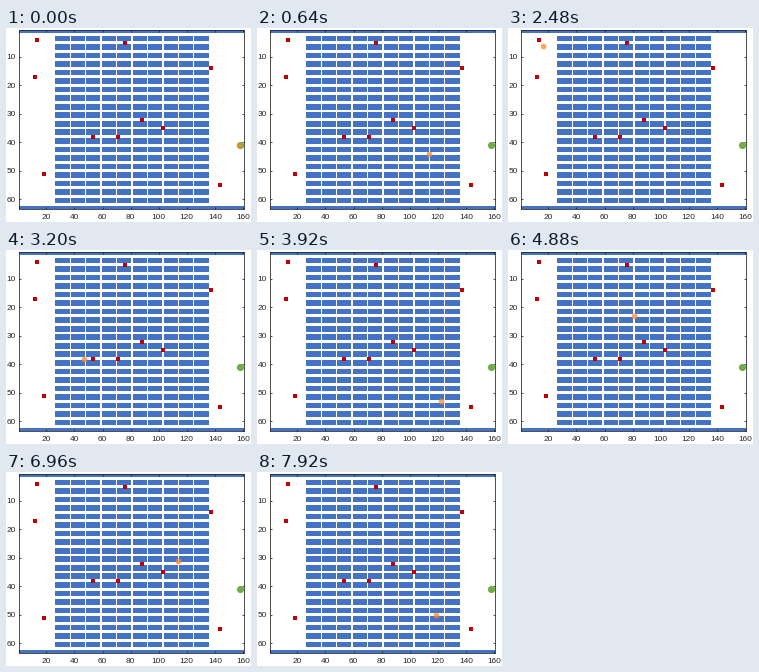
A matplotlib script that plays this animation: 245x194 px, repeating every 8000 ms.

```python
import matplotlib.pyplot as plt
from matplotlib.animation import FuncAnimation

WIDTH, HEIGHT, DPI = 245, 194, 100
FRAMES, INTERVAL = 100, 80
CELLS_PER_FRAME = 10
PX = 72 / DPI  # points per pixel

BLUE, RED, GREEN, ORANGE, INK = "#4472c4", "#c00000", "#70ad47", "#f98b2b", "#262626"

# Shelving: blocks two cells deep, with one-cell aisles and cross lanes.
FIRST_LANE, LANE_PITCH, COLUMNS = 26, 11, 10
FIRST_AISLE, AISLE_PITCH, ROWS = 2, 3, 20
LAST_LANE = FIRST_LANE + LANE_PITCH * COLUMNS

STATION = (158, 41)
NORTHWEST, WEST, SOUTHWEST = (13, 4), (12, 17), (18, 51)
NORTH, NORTHEAST, SOUTHEAST = (76, 5), (137, 14), (144, 55)
INNER = [(53, 38), (71, 38), (88, 32), (103, 35)]
PICKS = [NORTHWEST, WEST, SOUTHWEST, NORTH, NORTHEAST, SOUTHEAST, *INNER]

# Picks in visiting order, with a few turning points between them.
ROUTE = [
    STATION, INNER[3], (144, 44), SOUTHEAST, (81, 47), NORTH, NORTHWEST,
    SOUTHWEST, *INNER[:2], SOUTHEAST, (81, 44), NORTH, NORTHWEST, WEST,
    SOUTHWEST, *INNER[:3], (114, 32), NORTHEAST, SOUTHEAST, (81, 50),
]


def in_open(x):
    return not FIRST_LANE <= x <= LAST_LANE


def moves_sideways(x, y, dx, dy, was_sideways):
    """Zigzag on open floor; among shelves take the first useful lane."""
    if in_open(x):
        return dx != 0 and (dy == 0 or not was_sideways)
    in_lane = (x - FIRST_LANE) % LANE_PITCH == 0
    in_aisle = (y - FIRST_AISLE) % AISLE_PITCH == 0
    return not in_lane or dy == 0 or (in_aisle and abs(dy) < AISLE_PITCH)


def walk(route):
    x, y = route[0]
    cells = [(x, y)]
    for goal in route[1:]:
        sideways = False
        while (x, y) != goal:
            dx, dy = goal[0] - x, goal[1] - y
            sideways = moves_sideways(x, y, dx, dy, sideways)
            if sideways:
                x += 1 if dx > 0 else -1
            else:
                y += 1 if dy > 0 else -1
            cells.append((x, y))
        if goal in PICKS and in_open(x):
            cells.append(goal)  # rest for one step
    return cells


path = walk(ROUTE)

plt.rcParams["font.family"] = "Liberation Sans"
fig = plt.figure(figsize=(WIDTH / DPI, HEIGHT / DPI), dpi=DPI, facecolor="white")
left, right, top, bottom = 12.97, 237.62, 1.9, 181.1
ax = fig.add_axes([left / WIDTH, 1 - bottom / HEIGHT,
                   (right - left) / WIDTH, (bottom - top) / HEIGHT])
ax.set_xlim(0.5, 160.5)
ax.set_ylim(63.5, 0.5)
ax.set_xticks(range(20, 161, 20))
ax.set_yticks(range(10, 61, 10))
ax.tick_params(direction="in", top=True, right=True, length=2 * PX, width=0.8 * PX,
               pad=3 * PX, labelsize=8.3 * PX, color=INK, labelcolor=INK)
ax.tick_params(axis="x", pad=4.6 * PX)
for spine in ax.spines.values():
    spine.set(linewidth=0.8 * PX, color=INK)

for wall in (0.5, 62.5):
    ax.broken_barh([(0.5, 160)], (wall, 1), color=BLUE, lw=0)
blocks = [(FIRST_LANE + 0.5 + LANE_PITCH * k, LANE_PITCH - 1) for k in range(COLUMNS)]
for row in range(ROWS):
    ax.broken_barh(blocks, (FIRST_AISLE + 0.5 + AISLE_PITCH * row, AISLE_PITCH - 1),
                   color=BLUE, lw=0)

ax.plot(*zip(*PICKS), "s", color=RED, ms=4.8 * PX, mew=0, zorder=4)
ax.plot(*STATION, "o", color=GREEN, ms=7.2 * PX, mew=0, zorder=4)
picker, = ax.plot([], [], "o", color=ORANGE, alpha=0.75, ms=5.8 * PX, mew=0, zorder=5)


def update(frame):
    x, y = path[CELLS_PER_FRAME * frame + 1]
    picker.set_data([x], [y])
    return picker,


anim = FuncAnimation(fig, update, frames=FRAMES, interval=INTERVAL,
                     repeat=True, repeat_delay=0)
plt.show()
```
